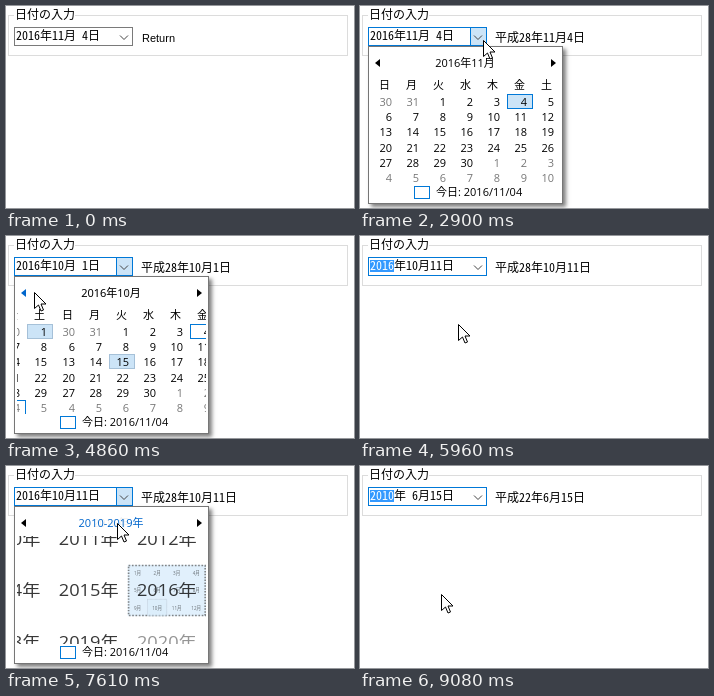
Write an HTML page with a canvas that moves like this. It is 348 px wide and 202 px high and loops after 9170 ms.

```html
<!DOCTYPE html>
<html lang="ja">
<head>
<meta charset="utf-8">
<style>
html, body { margin: 0; width: 100%; height: 100%; overflow: hidden; background: #fff; }
canvas { display: block; }
</style>
</head>
<body>
<canvas width="348" height="202"></canvas>
<script>
const g = document.querySelector('canvas').getContext('2d');
const LOOP = 9170, BLUE = '#0078d7', LINK = '#0066cc', PALE = '#cce4f7';
const UI = '11px "Open Sans", "Noto Sans CJK JP", sans-serif';
const GOTHIC = '12px "Noto Sans Mono CJK JP", "Noto Sans CJK JP", monospace';
const AREA = { x: 11, y: 71, w: 189, h: 107 };

// [time, year, month, day]
const VALUES = [[0, 2016, 11, 4], [3570, 2016, 11, 15], [4780, 2016, 10, 1], [5700, 2016, 10, 11],
  [7960, 2010, 10, 11], [8380, 2010, 6, 11], [9010, 2010, 6, 15]];
const OPEN = [[640, 1450], [2900, 3570], [4090, 5700], [6440, 9010]];
// [time, x, y] of the pointer tip
const PATH = [[70, 202, 70], [560, 118, 33], [700, 118, 33], [900, 112, 88], [990, 110, 92], [1280, 100, 192],
  [1450, 100, 192], [2290, 122, 36], [2650, 122, 36], [2670, 123, 34], [3000, 123, 34], [3500, 81, 128],
  [3600, 81, 128], [3920, 120, 34], [4090, 120, 34], [4630, 28, 56], [5250, 28, 56], [5600, 81, 128],
  [5760, 81, 128], [6200, 120, 36], [6270, 121, 33], [6440, 121, 33], [6670, 111, 57], [7670, 111, 57],
  [7900, 87, 97], [8240, 87, 97], [8380, 85, 118], [8790, 85, 118], [8940, 81, 128], [LOOP, 81, 128]];

const monthView = (y, m, d) => ({ title: `${y}年${m}月`, draw: () => drawMonth(y, m, d) });
const yearView = (y, m) => ({
  title: `${y}年`,
  draw: p => drawGrid(i => `${i + 1}月`, m - 1, p)
});
const decadeView = y => ({
  title: '2010-2019年',
  draw: p => drawGrid(i => `${2009 + i}年`, y - 2009, p, i => i === 0 || i === 11)
});

const lerp = (a, b, k) => a + (b - a) * k;
const last = (list, t) => list.filter(e => e[0] <= t).pop();

function text(s, x, y, color = '#000', align = 'left', font = UI) {
  g.font = font;
  g.textAlign = align;
  g.fillStyle = color;
  g.fillText(s, x, y);
}

function box(x, y, w, h, stroke, fill, dash = []) {
  if (fill) { g.fillStyle = fill; g.fillRect(x, y, w, h); }
  if (!stroke) return;
  g.strokeStyle = stroke;
  g.lineWidth = 1;
  g.setLineDash(dash);
  g.strokeRect(x + .5, y + .5, w - 1, h - 1);
  g.setLineDash([]);
}

function poly(points, fill, stroke) {
  g.beginPath();
  points.forEach(([x, y]) => g.lineTo(x, y));
  if (fill) { g.closePath(); g.fillStyle = fill; g.fill(); }
  if (stroke) { g.strokeStyle = stroke; g.lineWidth = 1; g.stroke(); }
}

function layer(alpha, draw) {
  g.save();
  g.globalAlpha *= alpha;
  draw();
  g.restore();
}

function pointer(t) {
  const i = PATH.findIndex(p => p[0] > t);
  const [t0, x0, y0] = PATH[i - 1], [t1, x1, y1] = PATH[i];
  const k = (t - t0) / (t1 - t0), e = k * k * (3 - 2 * k);
  return { x: Math.round(lerp(x0, x1, e)), y: Math.round(lerp(y0, y1, e)) };
}

function drawMonth(y, m, sel) {
  [...'日月火水木金土'].forEach((s, i) => text(s, 24.5 + 27 * i, 83, '#000', 'center'));
  const lead = new Date(y, m - 1, 1).getDay();
  for (let i = 0; i < 42; i++) {
    const date = new Date(y, m - 1, 1 - lead + i), day = date.getDate();
    const inside = date.getMonth() === m - 1;
    const today = date.getFullYear() === 2016 && date.getMonth() === 10 && day === 4;
    const chosen = inside && day === sel;
    const x = 12 + 27 * (i % 7), row = 88 + Math.round(15.2 * Math.floor(i / 7));
    if (chosen) box(x, row, 26, 15, '#7f9db9', PALE, [1, 1]);
    if (today) box(x, row, 26, 15, BLUE);
    text(day, x + 20, row + 12, inside ? '#000' : '#777', 'right');
  }
}

function cell(i) {
  const w = AREA.w / 4, h = AREA.h / 3;
  return { x: AREA.x + w * (i % 4), y: AREA.y + h * Math.floor(i / 4), w, h };
}

function drawGrid(label, sel, p, faded = () => false) {
  for (let i = 0; i < 12; i++) {
    const c = cell(i);
    const hot = p.x >= c.x && p.x < c.x + c.w && p.y >= c.y && p.y < c.y + c.h;
    if (i === sel) box(c.x, c.y, c.w, c.h, '#666', '#d9ecfb', [1, 1]);
    else if (hot) box(c.x, c.y, c.w, c.h, null, '#e5f3ff');
    text(label(i), c.x + c.w / 2, c.y + c.h / 2 + 4, hot ? LINK : faded(i) ? '#777' : '#000', 'center');
  }
}

// Draws a view so that its rectangle a lands on rectangle b
function mapped(view, a, b, alpha, p) {
  layer(alpha, () => {
    g.translate(b.x, b.y);
    g.scale(b.w / a.w, b.h / a.h);
    g.translate(-a.x, -a.y);
    view.draw(p);
  });
}

function zoom(outer, inner, index, k, zoomIn, p) {
  const c = cell(index), r = {};
  for (const key in c) r[key] = lerp(AREA[key], c[key], k);
  mapped(outer, c, r, zoomIn ? k ** .4 : k, p);
  mapped(inner, AREA, r, zoomIn ? 1 - k : (1 - k) ** .4, p);
}

function slide(from, to, k, p) {
  [[from, k], [to, k - 1]].forEach(([view, shift]) => layer(1, () => {
    g.translate(Math.round(190 * shift), 0);
    view.draw(p);
  }));
}

// [start, end, next view, transition]
const STEPS = [
  [4805, 5090, v => monthView(2016, 10, v[3]), slide],
  [6990, 7260, () => yearView(2016, 10), (a, b, k, p) => zoom(b, a, 9, k, false, p)],
  [7400, 7670, v => decadeView(v[1]), (a, b, k, p) => zoom(b, a, 7, k, false, p)],
  [7960, 8230, v => yearView(2010, v[2]), (a, b, k, p) => zoom(a, b, 1, 1 - k, true, p)],
  [8500, 8790, v => monthView(2010, 6, v[3]), (a, b, k, p) => zoom(a, b, 5, 1 - k, true, p)]
];

function drawPopup(t, value, p) {
  layer(1, () => {
    g.shadowColor = 'rgba(0,0,0,.5)';
    g.shadowBlur = 4;
    g.shadowOffsetX = g.shadowOffsetY = 3;
    box(8, 40, 195, 158, null, '#fff');
  });
  box(8, 40, 195, 158, '#767676', '#fff');

  const n = STEPS.filter(s => s[0] <= t).length;
  const viewAt = i => i ? STEPS[i - 1][2](value) : monthView(2016, 11, t < 3570 ? 4 : 15);
  const view = viewAt(n), step = STEPS[n - 1];
  const k = step ? Math.min(1, (t - step[0]) / (step[1] - step[0])) : 1;

  layer(1, () => {
    g.beginPath();
    g.rect(AREA.x, AREA.y - 1, AREA.w, AREA.h + 1);
    g.clip();
    if (k < 1) step[3](viewAt(n - 1), view, k, p);
    else view.draw(p);
  });

  const top = p.y > 46 && p.y < 68;
  const title = top && p.x > 75 && p.x < 135 ? LINK : '#000';
  if (k < 1) layer(.3 * (1 - k), () => text(viewAt(n - 1).title, 105, 61, '#000', 'center'));
  text(view.title, 105, 61, title, 'center');
  poly([[15, 57], [20, 53], [20, 61]], top && p.x < 45 ? LINK : '#000');
  poly([[196, 57], [191, 53], [191, 61]], '#000');

  box(54, 180, 16, 13, BLUE);
  text('今日: 2016/11/04', 76, 190, p.y > 179 ? LINK : '#000');
}

function drawPicker(t, value, open, p) {
  const [, y, m, d] = value;
  const pad = n => String(n).padStart(2);
  const hot = open || p && p.x >= 110 && p.x < 127 && p.y > 21 && p.y < 40;
  const active = t >= 640 || hot;
  box(8, 21, 119, 19, active ? BLUE : '#7a7a7a', '#fff');
  if (hot) box(110, 21, 17, 19, BLUE, open ? PALE : '#e5f1fb');
  poly([[114, 29.5], [118, 33.5], [122, 29.5]], null, '#444');

  const marked = t >= 1450 && !open;
  if (marked) box(10, 24, 24, 12, null, '#3399ff');
  text(y, 10, 34, marked ? '#fff' : '#000', 'left', GOTHIC);
  text(`年${pad(m)}月${pad(d)}日`, 34, 34, '#000', 'left', GOTHIC);

  if (t < 1450) text('Return', 136, 36, '#000', 'left', '11px "Liberation Sans", sans-serif');
  else text(`平成${y - 1988}年${m}月${d}日`, 135, 36, '#000', 'left', GOTHIC);
}

function drawPointer({ x, y }) {
  const shape = [[0, 0], [0, 16], [4, 12.5], [6.5, 18.5], [9, 17.5], [6.5, 11.5], [11.5, 11.5]];
  poly(shape.map(([a, b]) => [x + a + .5, y + b + .5]).concat([[x + .5, y + .5]]), '#fff', '#000');
}

function draw(t) {
  g.fillStyle = '#fff';
  g.fillRect(0, 0, 348, 202);
  box(2, 9, 340, 41, '#dcdcdc');
  box(8, 0, 61, 16, null, '#fff');
  text('日付の入力', 9, 13, '#000', 'left', GOTHIC);

  const value = last(VALUES, t);
  const open = OPEN.some(([a, b]) => t >= a && t < b);
  const p = t >= 70 ? pointer(t) : null;
  drawPicker(t, value, open, p);
  if (open) drawPopup(t, value, p);
  if (p) drawPointer(p);
}

const start = performance.now();
(function frame() {
  draw((performance.now() - start) % LOOP);
  requestAnimationFrame(frame);
})();
</script>
</body>
</html>
```
